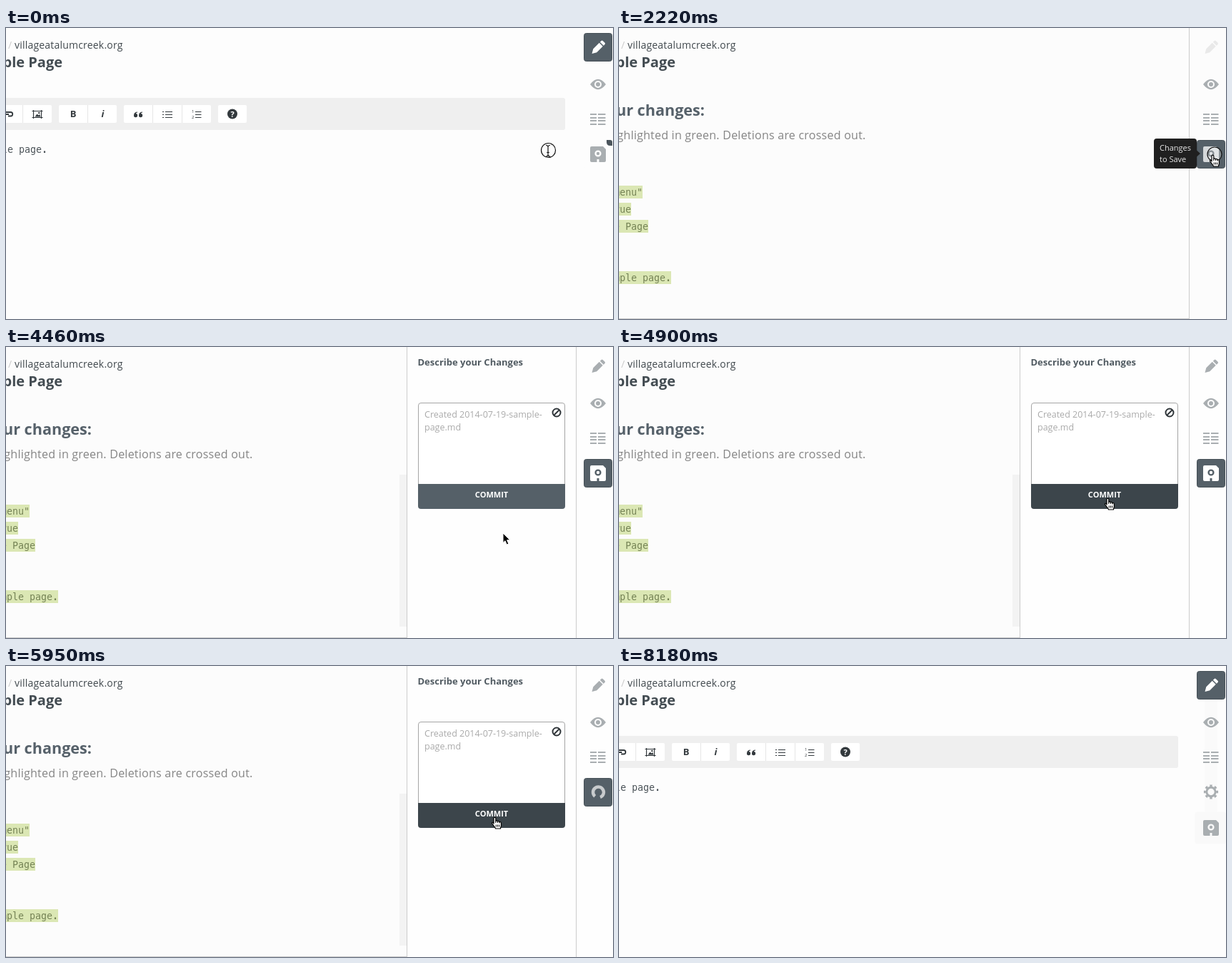
These frames come from a looping animation (850x408 px, 9130 ms). An HTML page:

```html
<!DOCTYPE html>
<html lang="en">
<head>
<meta charset="utf-8">
<title>Commit changes</title>
<style>
  html, body { margin: 0; width: 100%; height: 100%; overflow: hidden; background: #fdfdfd; }
  svg { display: block; width: 850px; height: 408px; }
  text { font-family: "Open Sans", sans-serif; white-space: pre; }
  .mono { font-family: "DejaVu Sans Mono", monospace; font-size: 13.3px; }
  .bold { font-weight: 700; }
  .end { text-anchor: end; }
  .mid { text-anchor: middle; }
  .loose { letter-spacing: .2px; }
</style>
</head>
<body>
<svg viewBox="0 0 850 408" xmlns="http://www.w3.org/2000/svg">
  <defs>
    <g id="pencil" transform="rotate(45)">
      <path d="M-3.500-7.500V-10Q-3.500-11.500-2-11.500H2Q3.500-11.500 3.500-10V-7.500ZM-3.500-6H3.500V6L0 12-3.500 6Z"/>
    </g>
    <path id="eye" fill-rule="evenodd" d="M-11 0Q0-14.500 11 0Q0 14.500-11 0ZM-5 0a5 5 0 1 0 10 0a5 5 0 1 0-10 0ZM-3 0a3 3 0 1 0 6 0a3 3 0 1 0-6 0Z"/>
    <path id="rows" d="M-11-7h9m2 0h10.500M-11-2h9m2 0h10.500M-11 2h9m2 0h10.500M-11 7h9m2 0h10.500" stroke-width="2"/>
    <path id="disk" fill-rule="evenodd" d="M-9-11H7L11-7V9Q11 11 9 11H1.500V7H-1.500V11H-9Q-11 11-11 9V-9Q-11-11-9-11ZM-4.600-1a4.600 4.600 0 1 0 9.200 0a4.600 4.600 0 1 0-9.200 0ZM-2.200-1a2.200 2.200 0 1 0 4.400 0a2.200 2.200 0 1 0-4.400 0Z"/>
    <g id="gear" fill="none">
      <circle r="6.200" stroke-width="3"/>
      <circle r="8.600" stroke-width="3" pathLength="16" stroke-dasharray="1" stroke-dashoffset=".5"/>
    </g>
  </defs>

  <rect id="backdrop" width="850" height="408"/>

  <g id="editor">
    <path d="M0 98H780q3 0 3 3V140q0 3-3 3H0Z" fill="#efefef"/>
    <g fill="#fff">
      <rect x="-18" y="108" width="82" height="25" rx="2"/>
      <rect x="74" y="108" width="81" height="25" rx="2"/>
      <rect x="165" y="108" width="122" height="25" rx="2"/>
      <rect x="297" y="108" width="40" height="25" rx="2"/>
    </g>
    <path d="M23.500 108v25M114.500 108v25M205.500 108v25M246.500 108v25" stroke="#e6e6e6"/>
    <g fill="none" stroke="#33393d" stroke-width="1.500">
      <path d="M0 118H6.500a2.700 2.700 0 0 1 0 5.500H3M-1 121H4" stroke-width="1.800"/>
      <path d="M38.500 115v12M49.500 115v12M36.500 116.500h15M36.500 125.500h15" stroke-width="1.200"/>
      <path d="M40.500 124.500l3-4 2 2 1.500-1.500 1.500 3.500z" fill="#33393d" stroke="none"/>
      <circle cx="46.300" cy="119" r="1.200" fill="#33393d" stroke="none"/>
      <path d="M223 117.500h10M223 121.500h10M223 125.500h10" stroke-width="1"/>
      <path d="M219 117.500h2M219 121.500h2M219 125.500h2" stroke-width="1.200"/>
      <path d="M265 117.500h8.500M265 121.500h8.500M265 125.500h8.500" stroke-width="1"/>
    </g>
    <g fill="#33393d">
      <path id="quote" d="M184 117.500q-5 .5-5 5a2.600 2.600 0 1 0 2.800-2.400q.3-1.300 2.200-1.600z"/>
      <use href="#quote" x="7"/>
      <text x="94" y="125" class="bold mid" font-size="13">B</text>
      <text x="135.500" y="125" class="bold mid" font-size="13" font-style="italic">i</text>
      <text x="260" y="119" font-size="6">1</text>
      <text x="260" y="126.500" font-size="6">2</text>
      <circle cx="317" cy="120.500" r="7"/>
      <text x="317" y="124.500" class="bold mid" font-size="11" fill="#fff">?</text>
    </g>
    <text x="58" y="175" class="mono end" fill="#4c5459">This is a sample page<tspan class="bold">.</tspan></text>
    <path id="caret" d="M58.500 162V178" stroke="#222"/>
  </g>

  <g id="review">
    <text x="120" y="123" class="bold end" font-size="21.600" fill="#56616a">Review your changes:</text>
    <text x="345.500" y="156" class="end loose" font-size="16.100" fill="#858585">Additions are highlighted in green. Deletions are crossed out.</text>
    <g id="added"></g>
    <path id="baseLine" stroke="#ccc"/>
    <g id="panel">
      <rect x="551" y="179" width="10" height="213" fill="#f3f3f3"/>
      <rect x="561" width="289" height="408" fill="#fefefe"/>
      <path d="M561.500 0V408" stroke="#ccc"/>
      <text x="576.500" y="26" class="bold" font-size="13" fill="#515b62">Describe your Changes</text>
      <path d="M577.500 193V82q0-3.500 3.500-3.500H779q3.500 0 3.500 3.500V193" fill="#fff" stroke="#a5a5a5"/>
      <g font-size="12.500" fill="#aaa">
        <text x="586" y="99">Created 2014-07-19-sample-</text>
        <text x="586" y="117">page.md</text>
      </g>
      <g fill="none" stroke="#30363a" stroke-width="2">
        <circle cx="771" cy="92" r="5.500"/>
        <path d="M767 96L775 88"/>
      </g>
      <path id="commit" d="M577 192H783V223q0 4-4 4H581q-4 0-4-4Z"/>
      <text x="680" y="211" class="bold mid" font-size="11" fill="#fff">COMMIT</text>
    </g>
    <path d="M798.500 0V408" stroke="#ccc"/>
  </g>

  <text x="3" y="29" font-size="14" fill="#ccc">/</text>
  <text x="12" y="29" class="loose" font-size="14" fill="#40484d">villageatalumcreek.org</text>
  <text x="79" y="55" class="bold end" font-size="20" fill="#434c52">Sample Page</text>

  <rect id="strip" x="820" y="48" width="18" height="157" fill="#fafafa"/>
  <rect id="editBox" x="809.500" y="7.500" width="39" height="39" rx="3" fill="#556068" stroke="#465057"/>
  <g id="pencilIcon" transform="translate(829 27.500)"><use href="#pencil"/></g>
  <use href="#eye" x="829" y="79" fill="#a9aeb1"/>
  <use href="#rows" x="829" y="128" stroke="#a9aeb1"/>
  <use id="gearIcon" href="#gear" x="829" y="176.500" stroke="#a9aeb1"/>
  <rect id="saveBox" rx="3"/>
  <use id="diskIcon" href="#disk" x="829"/>
  <path id="spinner" d="M7.200 1.900A7.450 7.450 0 1 0 1.900 7.200" fill="none" stroke="#c8cbcd" stroke-width="4.500"/>
  <path id="dirty" d="M841 157H846q3 0 3 3V165H846q-5 0-5-5Z" fill="#4b555c"/>

  <g id="tip">
    <path d="M753 155H805q4 0 4 4V171.500L814 176 809 180.500V193q0 4-4 4H753q-4 0-4-4V159q0-4 4-4Z" fill="#202020"/>
    <g font-size="11" fill="#e8e8e8">
      <text x="757" y="172">Changes</text>
      <text x="757" y="188">to Save</text>
    </g>
  </g>

  <circle id="ring" r="10" fill="#fff" fill-opacity=".3" stroke="#111" stroke-width="1.200"/>
  <path id="beam" d="M-3-7.500Q0-7.500 0-5.500Q0-7.500 3-7.500M0-5.500V6M-3 8Q0 8 0 6Q0 8 3 8M-1.800 2.500H1.800" fill="none" stroke="#111" stroke-width="1.200"/>
  <path id="arrow" d="M0 0V13.500L3 10.700 5.200 16 7.800 14.900 5.600 9.800H9.800Z" fill="#000" stroke="#fff"/>
  <g id="hand" stroke="#000" stroke-linejoin="round">
    <path d="M0 9V1.500C0-.3 2.800-.3 2.800 1.500V5.500C3.200 4.600 5.200 4.600 5.400 6 6 5.200 7.800 5.400 8 6.800 9 6.200 10.400 6.800 10.400 8.200V11.500C10.400 13 9.500 14 9.500 16H2.500C2 14 .3 12.600-1.500 10.200-3.800 7.400-1.600 6.400 0 9Z" fill="#fff" stroke-width="1.200"/>
    <path d="M2.800 5.500V8M5.400 6V8M8 6.800V8.500M3.300 10.500V13.500M5.500 10.500V13.500M7.700 10.500V13.500"/>
  </g>
</svg>
<script>
const LOOP = 9130;
const el = id => document.getElementById(id);
const show = (id, on) => el(id).setAttribute('display', on ? 'inline' : 'none');
const put = (id, attrs) => {
  for (const key in attrs) el(id).setAttribute(key, attrs[key]);
};

// Right edge, top and text of each highlighted line
el('added').innerHTML = [
  [33, 221, 'layout: "menu"'],
  [17, 245, 'published: true'],
  [41, 269, 'title: Sample Page'],
  [73, 341, 'This is a sample page<tspan class="bold">.</tspan>']
].map(([right, top, line]) =>
  `<rect y="${top}" width="${right}" height="18" fill="#dbe7b4"/>
   <text x="${right}" y="${top + 14}" class="mono end" fill="#758355">${line}</text>`
).join('');

// Start time, pointer shape, x, y
const pointer = [
  [0, 'beam', 759, 172],
  [300, 'beam', 770, 174],
  [450, 'beam', 794, 179],
  [590, 'hand', 819, 185],
  [740, 'hand', 829, 187],
  [890, 'hand', 831, 187],
  [1040, 'hand', 833, 186],
  [1180, 'hand', 834, 186],
  [3110, 'arrow', 794, 204],
  [3260, 'arrow', 726, 248],
  [3410, 'arrow', 699, 265],
  [4460, 'arrow', 696, 261],
  [4610, 'arrow', 692, 244],
  [4760, 'hand', 688, 225],
  [4900, 'hand', 687, 220],
  [7890, 'arrow', 732, 284],
  [8040, 'arrow', 824, 392],
  [8180, 'none', 0, 0]
];

function drawPointer(t) {
  const [, shape, x, y] = pointer.findLast(step => step[0] <= t);
  for (const id of ['beam', 'arrow', 'hand']) show(id, id === shape);
  if (shape === 'hand') put('hand', { transform: `translate(${x - 4} ${y - 8})` });
  else if (shape !== 'none') put(shape, { transform: `translate(${x} ${y})` });

  const pressed = t < 150 || (t >= 2220 && t < 2370) || (t >= 5650 && t < 5800);
  show('ring', pressed);
  const lift = shape === 'hand' ? 9 : 0.5;
  put('ring', { cx: shape === 'beam' ? x + .5 : x, cy: y - lift });
}

function drawSave(t, review, saved) {
  const hover = t >= 740 && t < 2220;
  const busy = t >= 5800 && t < 6100;
  const box = saved ? [807, 205, 43, 44] : [809.5, 157.5, 39, 39];
  const fill = review ? '#556068' : hover ? '#efefef' : saved ? '#f9f9f9' : '#fdfdfd';
  put('saveBox', {
    x: box[0], y: box[1], width: box[2], height: box[3],
    fill, stroke: review ? '#465057' : fill
  });
  const entering = t >= 2220 && t < 2370;
  const fade = t < 6400 ? .4 : t < 6550 ? .65 : t < 6700 ? .85 : 1;
  put('diskIcon', {
    y: saved ? 227 : 177,
    fill: entering ? '#d5d8da' : review ? '#fff' : '#a9aeb1',
    opacity: saved ? fade : 1
  });
  show('diskIcon', !busy);
  show('spinner', busy);
  put('spinner', { transform: `translate(829.500 177) rotate(${t < 5950 ? 0 : 55})` });
}

function draw(t) {
  const review = t >= 2220 && t < 6100;
  const open = t >= 2370;
  const saved = t >= 6100;

  put('backdrop', { fill: review ? '#fcfcfc' : '#fdfdfd' });
  show('editor', !review);
  show('review', review);
  show('panel', open);
  put('baseLine', { d: `M0 407.500H${open ? 561 : 798}` });
  show('caret', (t >= 150 && t < 590) || (t >= 1180 && t < 1630));
  put('commit', { fill: t >= 4760 ? '#3c454b' : '#556068' });

  show('editBox', !review);
  put('pencilIcon', { fill: !review ? '#fff' : open ? '#a9aeb1' : '#e9e9e9' });
  show('strip', saved);
  show('gearIcon', saved);
  show('dirty', t < 2220);
  show('tip', t >= 740 && t < 3110);
  drawSave(t, review, saved);
  drawPointer(t);
}

const start = performance.now();
function tick() {
  draw((performance.now() - start) % LOOP);
  requestAnimationFrame(tick);
}
tick();
</script>
</body>
</html>
```
